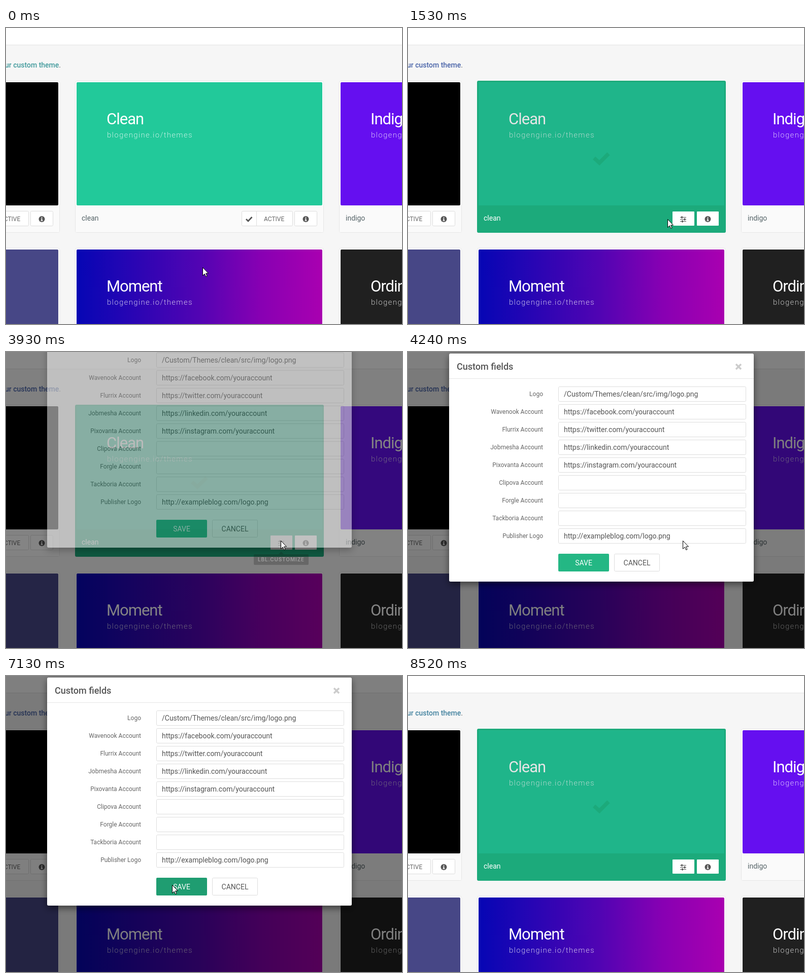
An HTML page for the animation above (9900 ms loop, 780 px wide and 584 px high).

```html
<!DOCTYPE html>
<html lang="en">
<head>
<meta charset="utf-8">
<title>Theme settings</title>
<style>
html, body { margin: 0; width: 100%; height: 100%; overflow: hidden; background: #f6f6f6; }
svg { display: block; width: 780px; height: 584px; }
text { font-family: Roboto, Arial, sans-serif; font-size: 14px; fill: #555; white-space: pre; }
.title { font-size: 31px; letter-spacing: -1px; fill: #fff; }
.url { font-size: 15px; font-weight: 300; letter-spacing: 1.3px; fill: #fff; opacity: .72; }
.name { fill: #566468; }
.small { font-size: 12px; fill: #666; }
.tip { font: 600 10px Inter, sans-serif; letter-spacing: .9px; fill: #fff; }
.box { fill: #fff; stroke: #ddd; }
.white { fill: #fff; }
</style>
</head>
<body>
<svg id="stage" viewBox="0 0 780 584">
  <defs>
    <linearGradient id="blend">
      <stop offset="0" stop-color="#0606b4"/>
      <stop offset=".5" stop-color="#5204b3"/>
      <stop offset=".75" stop-color="#8800b3"/>
      <stop offset="1" stop-color="#a900b0"/>
    </linearGradient>
    <filter id="shadow" x="-10%" y="-10%" width="120%" height="125%">
      <feDropShadow dx="0" dy="5" stdDeviation="7" flood-opacity=".5"/>
    </filter>
  </defs>
  <g id="page"></g>
  <g id="active"></g>
  <rect id="backdrop" width="780" height="584"/>
  <g id="tip"></g>
  <g id="modal"></g>
  <g id="cursor">
    <path id="arrow" d="M.5.5V16.5L4.2 13 6.7 18.5 9 17.5 6.6 12H11.5Z" fill="#fff" stroke="#000"/>
    <path id="beam" d="M-3-7.5H-1L0-6.5 1-7.5H3M0-6.5V6.5M-3 7.5H-1L0 6.5 1 7.5H3" fill="none" stroke="#000"/>
  </g>
</svg>
<script>
const $ = id => document.getElementById(id);
const LOOP = 9900, STEP = LOOP / 128;

const rect = (x, y, w, h, fill, rx = 0, extra = '') =>
  `<rect x="${x}" y="${y}" width="${w}" height="${h}" rx="${rx}" fill="${fill}" ${extra}/>`;
const box = (x, y, w, h, id = '') =>
  `<rect class="box" id="${id}" x="${x + .5}" y="${y + .5}" width="${w - 1}" height="${h - 1}" rx="2"/>`;
const text = (x, y, str, cls = '', extra = '') =>
  `<text x="${x}" y="${y}" class="${cls}" ${extra}>${str}</text>`;
const line = (d, color, width) =>
  `<path d="${d}" fill="none" stroke="${color}" stroke-width="${width}"/>`;

const info = (x, y) => `<circle cx="${x}" cy="${y}" r="6" fill="#555"/>` +
  line(`M${x - 1} ${y - 3.2}h2M${x - 1.5} ${y - .5}h2.5M${x} ${y - 1}v4.5M${x - 2} ${y + 3}h4`, '#fff', 1.5);

const heading = (x, y, title) =>
  text(x + 62, y + 86, title, 'title') + text(x + 63, y + 112, 'blogengine.io/themes', 'url');

function card(x, y, fill, title = '', name = '', id = '') {
  return rect(x + .5, y + .5, 489, 299, '#fff', 3, 'stroke="#e6e6e6"') +
    rect(x + 1, y + 246, 488, 53, '#fafafa', 2) +
    rect(x + 3, y + 3, 484, 243, fill, 2) +
    (title && heading(x, y, title)) +
    text(x + 13, y + 276, name, 'name') +
    box(x + 328, y + 257, 101, 30, id) +
    line(`M${x + 357.5} ${y + 258}v28`, '#ddd', 1) +
    line(`M${x + 337} ${y + 273}l4 4 7.5-8`, '#555', 2.8) +
    text(x + 372, y + 277, 'ACTIVE', 'small') +
    box(x + 432, y + 257, 45, 30) + info(x + 454.5, y + 273);
}

$('page').innerHTML = rect(0, 0, 780, 584, '#f6f6f6') +
  rect(0, 0, 780, 33, '#fff') + rect(0, 33, 780, 1, '#e2e2e2') +
  text(108, 78, '<tspan id="link" font-weight="500">your custom theme</tspan>.', '', 'text-anchor="end"') +
  card(-384, 104, '#000') +
  card(136, 104, '#22c99a', 'Clean', 'clean', 'activate') +
  card(656, 104, '#650ff0', 'Indigo', 'indigo') +
  card(-384, 434, '#474786') +
  card(136, 434, 'url(#blend)', 'Moment') +
  card(656, 434, '#202020', 'Ordinary');

$('active').innerHTML = rect(136, 104, 490, 300, '#1caa7b', 3) +
  rect(139, 107, 484, 243, '#22c99a') + heading(136, 104, 'Clean') +
  rect(139, 107, 484, 243, '#000', 0, 'opacity=".1"') +
  line('M366.5 256.5l10.5 9.5 18-18', '#1caa7b', 7.5) +
  text(149, 380, 'clean', 'white') +
  rect(521, 362, 43, 28, '#fff', 1, 'id="customize"') +
  rect(569, 362, 43, 28, '#fff', 1) + info(590.5, 377) +
  line('M536 373.5h12M536 377.5h12M536 381.5h12', '#555', 1) +
  line('M539.5 371.5v4M545 375.5v4M540.5 379.5v4', '#555', 2.5);

$('tip').innerHTML = rect(488, 399, 108, 21, '#1a1a1a', 2) +
  '<path d="M537 399l5-5 5 5z" fill="#1a1a1a"/>' +
  text(496, 413, 'LBL.CUSTOMIZE', 'tip');

const fields = [
  ['Logo', '/Custom/Themes/clean/src/img/logo.png'],
  ['Wavenook Account', 'https://facebook.com/youraccount'],
  ['Flurrix Account', 'https://twitter.com/youraccount'],
  ['Jobmesha Account', 'https://linkedin.com/youraccount'],
  ['Pixovanta Account', 'https://instagram.com/youraccount'],
  ['Clipova Account', ''],
  ['Forgle Account', ''],
  ['Tackboria Account', ''],
  ['Publisher Logo', 'http://exampleblog.com/logo.png']
];
$('modal').innerHTML = rect(81, 3, 600, 450, '#fff', 3, 'filter="url(#shadow)"') +
  text(96, 35, 'Custom fields', '', 'style="font-size:18px;font-weight:500"') +
  line('M646 24l10 10m0-10l-10 10', '#ccc', 3.6) +
  rect(81, 52, 600, 1, '#e5e5e5') +
  fields.map(([label, value], i) => {
    const y = 68 + 35 * i;
    return text(266, y + 19, label, 'small', 'text-anchor="end"') +
      box(296, y, 370, 30) + text(307, y + 20, value);
  }).join('') +
  rect(296, 398, 100, 35, '#24b784', 2, 'id="save"') +
  text(346, 421, 'SAVE', 'white', 'text-anchor="middle"') +
  box(406, 398, 90, 35) + text(451, 421, 'CANCEL', '', 'text-anchor="middle"');

// Pointer path: time, x, y
const path = [
  [0, 387, 472], [462, 387, 472], [1160, 511, 377], [2622, 511, 377],
  [3090, 541, 372], [5183, 541, 372], [5420, 515, 366], [5640, 440, 369],
  [5800, 386, 387], [6190, 343, 410], [6680, 350, 361], [6980, 330, 417],
  [7130, 327, 412], [7812, 327, 412], [8520, 300, 592], [LOOP, 300, 592]
];

const ramp = (t, a, b) => Math.min(1, Math.max(0, (t - a) / (b - a)));

// Speed at a path point; zero beside a rest
function speed(i, c) {
  const a = path[i - 1], p = path[i], b = path[i + 1];
  if (!a || !b || a[c] === p[c] || b[c] === p[c]) return 0;
  return (b[c] - a[c]) / (b[0] - a[0]);
}

function pointer(t) {
  const i = Math.max(0, path.findIndex(p => p[0] > t) - 1);
  const a = path[i], b = path[i + 1], d = b[0] - a[0], u = (t - a[0]) / d;
  return [1, 2].map(c => {
    const s = u * u * (3 - 2 * u);
    return Math.round(a[c] + (b[c] - a[c]) * s +
      d * u * (1 - u) * ((1 - u) * speed(i, c) - u * speed(i + 1, c)));
  });
}

const fade = (id, v) => {
  $(id).setAttribute('opacity', v);
  $(id).style.display = v > 0 ? '' : 'none';
};

function draw(now) {
  const t = Math.min(Math.floor((now % LOOP + 20) / STEP) * STEP, LOOP - 1);
  const [x, y] = pointer(t);
  const over = (l, top, r, b) => x >= l && x < r && y >= top && y < b;

  $('link').style.fill = t < 1300 ? '#419a9c' : t < 7500 ? '#4863a8' : '#42829f';
  $('activate').style.fill = over(464, 361, 565, 391) ? '#e6e6e6' : '#fff';
  $('customize').style.fill = over(521, 362, 564, 390) ? '#e6e6e6' : '#fff';
  $('save').style.fill = over(296, 398, 396, 433) ? '#1f9d71' : '#24b784';

  fade('active', ramp(t, 1290, 1465));
  fade('tip', ramp(t, 2930, 3080) - ramp(t, 3830, 3980));
  fade('backdrop', .5 * (ramp(t, 3800, 3950) - ramp(t, 7830, 7980)));
  fade('modal', ramp(t, 3870, 4020) - ramp(t, 7390, 7460));
  const left = 1 - ramp(t, 3870, 4200);
  $('modal').setAttribute('transform', `translate(0 ${-112 * left * left})`);

  const typing = t > 5200 && t < 7400 && over(296, 348, 666, 378);
  $('arrow').style.display = typing ? 'none' : '';
  $('beam').style.display = typing ? '' : 'none';
  $('cursor').setAttribute('transform', `translate(${x} ${y})`);
}

const start = performance.now();
function tick() {
  draw(performance.now() - start);
  requestAnimationFrame(tick);
}
tick();
</script>
</body>
</html>
```
